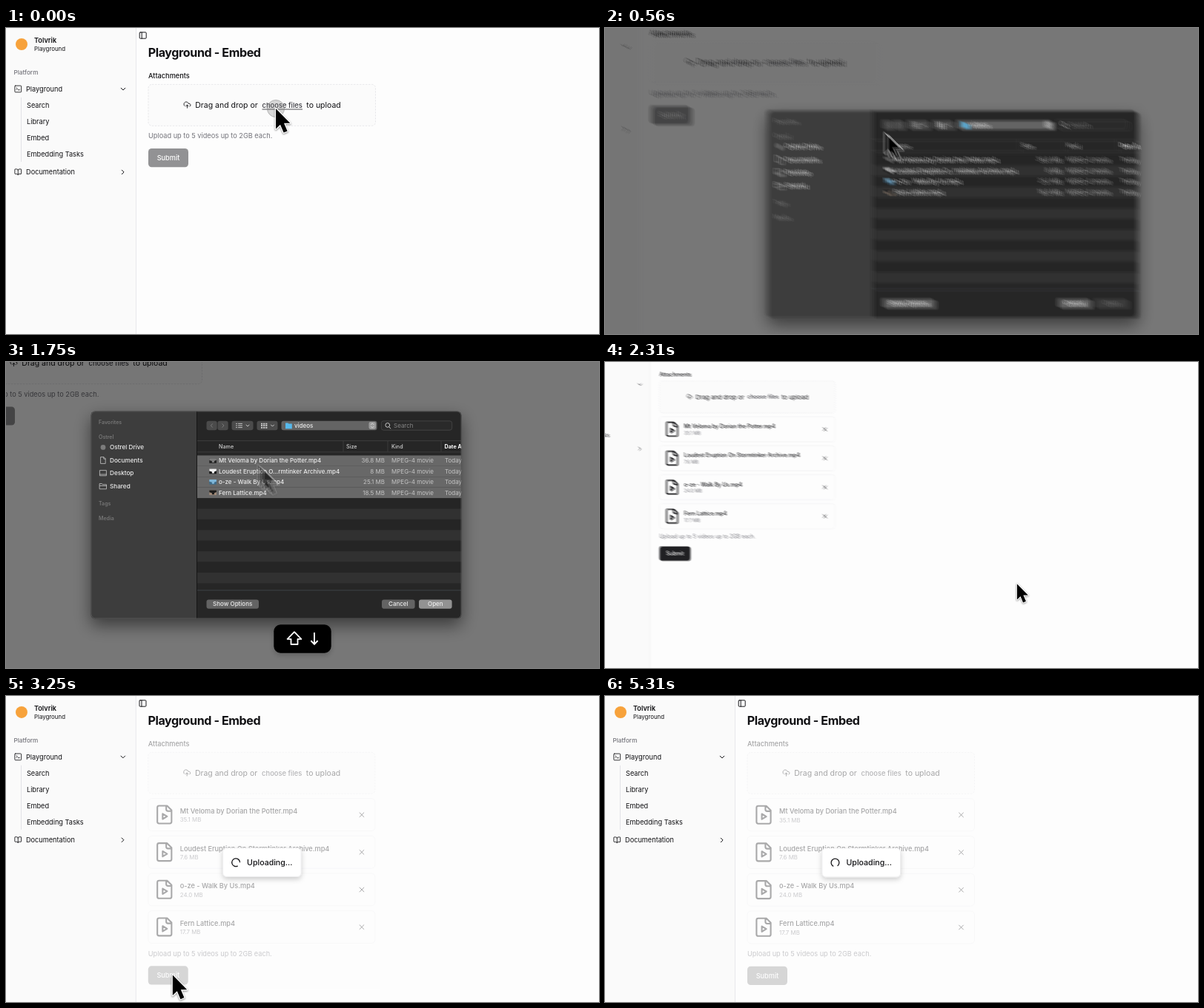
Recreate the animation shown at these times as an HTML page. Size 800 px wide and 414 px high, loop 5.37 s.

```html
<!DOCTYPE html>
<html lang="en">
<head>
<meta charset="utf-8">
<title>Upload demo</title>
<style>
  html, body { margin: 0; width: 100%; height: 100%; overflow: hidden; background: #fdfdfd; }
  svg { display: block; width: 100vw; height: 100vh; }
  text { font: 400 9.2px Inter, "Open Sans", sans-serif; fill: #111114; white-space: pre; }
  .b { font-weight: 600; }
  .m { font-weight: 500; }
  .xs { font-size: 7.9px; }
  .lg { font-size: 10.5px; }
  .mute { fill: #74747b; }
  .icon { fill: none; stroke: #18181b; stroke-width: 2; stroke-linecap: round; stroke-linejoin: round; }
  #dialog text { font-size: 8px; font-weight: 500; fill: #ececec; }
  #dialog .head { font-size: 7px; font-weight: 600; fill: #767676; }
  #dialog .side { font-size: 8.2px; }
  #dialog .col { font-size: 7.2px; fill: #d0d0d0; }
  #dialog .soft { font-weight: 400; fill: #c4c4c4; }
  #dialog .mid { text-anchor: middle; }
  .thin { fill: none; stroke: #c8c8c8; stroke-width: .8; stroke-linecap: round; stroke-linejoin: round; }
</style>
</head>
<body>
<svg viewBox="0 0 800 414" preserveAspectRatio="none">
  <defs>
    <filter id="pageBlur" filterUnits="userSpaceOnUse" x="-40" y="-40" width="1280" height="700" color-interpolation-filters="sRGB"></filter>
    <filter id="cursorBlur" filterUnits="userSpaceOnUse" x="-60" y="-60" width="150" height="160" color-interpolation-filters="sRGB"></filter>
    <filter id="deepShadow" x="-20%" y="-20%" width="140%" height="150%">
      <feDropShadow dx="0" dy="9" stdDeviation="11" flood-opacity=".5"/>
    </filter>
    <filter id="softShadow" x="-20%" y="-30%" width="140%" height="180%">
      <feDropShadow dx="0" dy="3" stdDeviation="3.5" flood-opacity=".2"/>
    </filter>
    <clipPath id="frame"><rect width="500" height="281" rx="6"/></clipPath>
  </defs>

  <g id="page">
    <rect width="1200" height="621" fill="#fdfdfd"/>
    <rect width="175.5" height="621" fill="#fafafa"/>
    <path d="M175.5 0V621" stroke="#e8e8eb"/>

    <circle cx="21" cy="22" r="8" fill="#f7a23b"/>
    <text x="38" y="19.8" class="b">Tolvrik</text>
    <text x="38" y="30.8" class="xs">Playground</text>
    <text x="10.5" y="63" class="m mute" style="font-size:8.2px">Platform</text>
    <g class="icon" transform="translate(11 77.2) scale(.4375)">
      <rect x="2" y="2" width="20" height="20" rx="2"/><path d="M7 8l3 3-3 3M12 15h5"/>
    </g>
    <text x="27" y="86">Playground</text>
    <path class="icon" style="stroke-width:1" d="M155.2 81.2l2.8 2.8 2.8-2.8"/>
    <path d="M20.5 94V181" stroke="#e2e2e6"/>
    <text x="28" y="107.8">Search</text>
    <text x="28" y="129.8">Library</text>
    <text x="28" y="152.2">Embed</text>
    <text x="28" y="174.2">Embedding Tasks</text>
    <path class="icon" transform="translate(11 189.6) scale(.4375)" d="M12 7v14M3 18a1 1 0 0 1-1-1V4a1 1 0 0 1 1-1h5a4 4 0 0 1 4 4 4 4 0 0 1 4-4h5a1 1 0 0 1 1 1v13a1 1 0 0 1-1 1h-6a3 3 0 0 0-3 3 3 3 0 0 0-3-3z"/>
    <text x="27" y="198.3">Documentation</text>
    <path class="icon" style="stroke-width:1" d="M156.3 192.2l2.8 2.8-2.8 2.8"/>
    <g class="icon" style="stroke-width:1">
      <rect x="180.2" y="5.8" width="9" height="8.4" rx="1"/><path d="M183.2 5.8v8.4"/>
    </g>

    <text x="191.7" y="38.8" style="font-size:16.1px;font-weight:700;letter-spacing:-.4px">Playground - Embed</text>
    <text x="192" y="68.4" class="m">Attachments</text>
    <rect x="192" y="76.3" width="306.5" height="56" rx="5" fill="#fbfbfb" stroke="#e8e8eb" stroke-dasharray="2.5 1.5"/>
    <path class="icon" transform="translate(239 98.6) scale(.455)" d="M4 14.9A7 7 0 1 1 15.7 8h1.8a4.5 4.5 0 0 1 2.5 8.2M12 12v9M8 16l4-4 4 4"/>
    <text x="255.3" y="107.9" class="lg">Drag and drop or</text>
    <text x="345.5" y="107.7" class="m" style="font-size:9.4px;fill:#3a3a40">choose files</text>
    <path id="underline" d="M345.5 110H400" stroke="#3a3a40" stroke-width=".9"/>
    <text x="405.3" y="107.9" class="lg">to upload</text>

    <g id="files"></g>
    <g id="footer">
      <text x="192" y="149.2" class="mute">Upload up to 5 videos up to 2GB each.</text>
      <g id="submit">
        <rect x="192" y="163" width="54" height="25.2" rx="4.5" fill="#202023"/>
        <text x="219" y="179" class="m" text-anchor="middle" style="fill:#fff">Submit</text>
      </g>
    </g>

    <g id="upload">
      <rect x="186" y="56" width="319" height="341" fill="#fdfdfd" opacity=".63"/>
      <rect x="293" y="206" width="105.5" height="38.8" rx="5" fill="#fff" stroke="#e8e8ea" stroke-width=".6" filter="url(#softShadow)"/>
      <path id="spinner" class="icon" style="stroke-width:1.3" d="M5.4 0A5.4 5.4 0 1 1 1.67 -5.14"/>
      <text x="325.5" y="229.2" class="m" style="font-size:10.6px">Uploading...</text>
    </g>

    <rect id="dim" width="1200" height="621"/>

    <g id="dialog" transform="translate(348.5 169)">
      <rect width="500" height="281" rx="6" fill="#262626" filter="url(#deepShadow)"/>
      <g clip-path="url(#frame)">
        <rect width="143" height="281" fill="#3d3d3d"/>
        <path d="M143 0V281" stroke="#171717"/>
        <text x="10.5" y="17.6" class="head">Favorites</text>
        <text x="10.5" y="37.6" class="head">Ostrel</text>
        <text x="25.5" y="52" class="side">Ostrel Drive</text>
        <text x="25.5" y="69.5" class="side">Documents</text>
        <text x="25.5" y="87" class="side">Desktop</text>
        <text x="25.5" y="104.5" class="side">Shared</text>
        <text x="10.5" y="127.8" class="head">Tags</text>
        <text x="10.5" y="147.8" class="head">Media</text>
        <circle cx="16.5" cy="49" r="3.4" fill="#7c7c7c"/>
        <path class="thin" d="M13.5 62.2h4l2.2 2.2v6.6h-6.2zM17.3 62.4v2.3h2.2M12.3 80.2h8.6v7.2h-8.6zM12.3 85.6h8.6M12 98.2h3l1 1.2h5v6h-9zM12 101h9"/>

        <g fill="#4b4b4b">
          <rect x="156" y="13.4" width="14.2" height="12.4" rx="3"/>
          <rect x="171" y="13.4" width="14.2" height="12.4" rx="3"/>
          <rect x="190" y="13.4" width="29" height="12.4" rx="3"/>
          <rect x="224" y="13.4" width="28" height="12.4" rx="3"/>
          <rect x="257" y="13.4" width="129" height="12.4" rx="3" fill="#646464"/>
          <rect x="375" y="14.6" width="9.6" height="10" rx="2.4" fill="#9a9a9a"/>
        </g>
        <path class="thin" d="M164 17.3l-2.2 2.3 2.2 2.3M177.3 17.3l2.2 2.3-2.2 2.3" style="stroke:#858585"/>
        <path class="thin" style="stroke:#e4e4e4" d="M196 17h1M199 17h5M196 19.6h1M199 19.6h5M196 22.2h1M199 22.2h5M209.5 18.7l2 2 2-2M243 18.7l2 2 2-2M378 18.4l1.8-2 1.8 2M378 20.8l1.8 2 1.8-2"/>
        <path d="M229.5 17.2h8.4M229.5 19.8h8.4M229.5 22.4h8.4" stroke="#cfcfcf" stroke-width="1.8" stroke-dasharray="2.2 .9"/>
        <path d="M262.5 16h3.4l1 1.2h4.4v6.6h-8.8z" fill="#56b9ec"/>
        <text x="274.5" y="22.5">videos</text>
        <rect x="391.8" y="13.4" width="95.4" height="12.4" rx="3" fill="#2a2a2a" stroke="#4a4a4a" stroke-width=".8"/>
        <path class="thin" style="stroke-width:1" d="M402.4 21.6l2 2M403.2 19a2.9 2.9 0 1 1-5.8 0a2.9 2.9 0 1 1 5.8 0"/>
        <text x="408.5" y="22.5" style="fill:#858585;font-weight:400">Search</text>

        <path d="M143.5 40.2H500M143.5 55.5H500M340.5 40.5V55M400.5 40.5V55M472.5 40.5V55" stroke="#434343" stroke-width=".8"/>
        <text x="172.5" y="50.5" class="col">Name</text>
        <text x="344.5" y="50.5" class="col">Size</text>
        <text x="405.5" y="50.5" class="col">Kind</text>
        <text x="477" y="50.5" class="col" style="fill:#fff;font-weight:700">Date Added</text>
        <g id="rows"></g>
        <path d="M143.5 242.5H500" stroke="#454a50" stroke-width=".8"/>

        <rect x="156" y="255" width="70.5" height="12.4" rx="3" fill="#636363"/>
        <text x="191.2" y="264.1" class="mid">Show Options</text>
        <rect x="392.5" y="255" width="44.6" height="12.4" rx="3" fill="#636363"/>
        <text x="414.8" y="264.1" class="mid">Cancel</text>
        <rect id="openBox" x="442.5" y="255" width="44.6" height="12.4" rx="3"/>
        <text id="openText" x="464.8" y="264.1" class="mid">Open</text>
      </g>
      <rect x=".4" y=".4" width="499.2" height="280.2" rx="6" fill="none" stroke="#636363" stroke-width=".8"/>
    </g>
  </g>

  <g id="pointer">
    <circle id="press" r="11.6" fill="#777" fill-opacity=".28" stroke="#8a8a8a" stroke-opacity=".55"/>
    <path d="M0 0V27.5L6 21.8L10.6 32.6L15.6 30.4L11 19.8H19.4Z" fill="#000" stroke="#fff" stroke-width="2.6" stroke-linejoin="round" paint-order="stroke" style="filter:drop-shadow(0 1px 1.2px rgba(0,0,0,.45))"/>
  </g>

  <g id="keys">
    <rect x="361.3" y="355.3" width="77.4" height="38.4" rx="9" fill="#000" filter="url(#softShadow)"/>
    <path d="M389 365.2l9.4 9.6h-4.9v7.2h-9v-7.2h-4.9z" fill="none" stroke="#fff" stroke-width="1.8" stroke-linejoin="round"/>
    <path d="M416 366v15.6M411.4 377l4.6 4.8 4.6-4.8" fill="none" stroke="#fff" stroke-width="1.9"/>
  </g>
</svg>

<script>
const LOOP = 5370, SHUTTER = 15;
const $ = id => document.getElementById(id);
const show = (id, alpha) => {
  $(id).style.opacity = alpha;
  $(id).style.display = alpha > 0 ? '' : 'none';
};

const videos = [
  { name: 'Mt Veloma by Dorian the Potter.mp4', disk: '36.8 MB', size: '35.1 MB', tone: '#7d7d7d', base: '#222' },
  { name: 'Loudest Eruption On Stormtinker Archive.mp4', short: 'Loudest Eruption O...rmtinker Archive.mp4', disk: '8 MB', size: '7.6 MB', tone: '#f0f0f0', base: '#111' },
  { name: 'o-ze - Walk By Us.mp4', disk: '25.1 MB', size: '24.0 MB', tone: '#7fb6d8', base: '#3d6a88' },
  { name: 'Fern Lattice.mp4', disk: '18.5 MB', size: '17.7 MB', tone: '#1c1c1c', base: '#a08a78' }
];
const ROW = 14.42, CARD = 50.7;

$('files').innerHTML = videos.map((v, i) => `
  <g transform="translate(0 ${i * CARD})">
    <rect x="192" y="138.8" width="306.5" height="44" rx="5" fill="#fdfdfd" stroke="#eeeef0" stroke-width=".9"/>
    <path class="icon" style="stroke-width:1.75" transform="translate(199.6 146.3) scale(1.2)"
      d="M15 2H6a2 2 0 0 0-2 2v16a2 2 0 0 0 2 2h12a2 2 0 0 0 2-2V7zM14 2v4a2 2 0 0 0 2 2h4M10 11l5 3-5 3z"/>
    <text x="235" y="159.1" class="m">${v.name}</text>
    <text x="235" y="170.6" class="xs mute">${v.size}</text>
    <path class="icon" style="stroke-width:1" d="M477.6 158l5.8 5.8m0-5.8l-5.8 5.8"/>
  </g>`).join('');

const stripes = Array.from({ length: 12 }, (_, i) =>
  `<rect x="143.5" y="${60 + i * ROW}" width="357" height="${ROW}" fill="${i % 2 ? '#313131' : '#252525'}"/>`);
const entries = videos.map((v, i) => `
  <g transform="translate(0 ${60 + i * ROW})">
    <rect id="pick${i}" x="143.5" width="357" height="${ROW}" fill="#686868"/>
    <rect x="159.8" y="3.8" width="9.6" height="6.6" fill="${v.base}"/>
    <path d="M159.8 3.8h9.6v2.6l-3 1.2v2h-3v-2l-3.6-1z" fill="${v.tone}"/>
    <text x="172.5" y="10">${v.short || v.name}</text>
    <text x="396.5" y="10" class="soft" text-anchor="end">${v.disk}</text>
    <text x="405.5" y="10" class="soft">MPEG-4 movie</text>
    <text x="477.5" y="10" class="soft">Today at 14:05</text>
  </g>`);
$('rows').innerHTML = stripes.concat(entries).join('');

// Each halving step averages the image with a shifted copy: eight samples along one line.
const HALVES = [1 / 2, 1 / 4, 1 / 8];
for (const id of ['pageBlur', 'cursorBlur']) {
  $(id).innerHTML = '<feOffset in="SourceGraphic" result="r0"/>' + HALVES.map((_, i) => `
    <feOffset in="r${i}" result="o${i}"/>
    <feComposite in="r${i}" in2="o${i}" operator="arithmetic" k2=".5" k3=".5" result="r${i + 1}"/>`).join('');
}

const ramp = (t, a, b) => Math.min(1, Math.max(0, (t - a) / (b - a)));
const fade = (t, a, b, c, d) => ramp(t, a, b) * (1 - ramp(t, c, d));

// Critically damped spring from 0 to 1.
const spring = (t, start, rate) => {
  const x = Math.max(0, t - start) * rate;
  return 1 - (1 + x) * Math.exp(-x);
};

function camera(t) {
  const leave = spring(t, 2107, .0115);
  const hold = spring(t, 400, .0115) * (1 - leave);
  return { x: -234 * hold, y: -102.6 * hold, s: 1 - (leave - spring(t, 2570, .0115)) / 3 };
}

const stops = [[364, 109], [570, 239], [816, 431], [225, 378]];
const departs = [397, 1732, 2500];

function cursor(t) {
  return [0, 1].map(axis => departs.reduce((sum, start, i) =>
    sum + (stops[i + 1][axis] - stops[i][axis]) * spring(t, start, .015), stops[0][axis]));
}

function project(t, [x, y]) {
  const c = camera(t);
  return [c.x + x * c.s, c.y + y * c.s];
}

// Blurs along the way a point travels while the shutter is open.
function smear(target, filter, t, point) {
  const a = point(t - SHUTTER / 2), b = point(t + SHUTTER / 2);
  const d = a.map((v, i) => b[i] - v);
  const moving = Math.hypot(...d) > .5;
  target.setAttribute('filter', moving ? `url(#${filter})` : 'none');
  if (!moving) return;
  const shifts = [-7 / 16, ...HALVES];
  $(filter).querySelectorAll('feOffset').forEach((el, i) => {
    el.setAttribute('dx', d[0] * shifts[i]);
    el.setAttribute('dy', d[1] * shifts[i]);
  });
}

const clicks = [0, 2080, 3010];
const picks = [1000, 1290, 1440, 1590];

function draw(t) {
  const c = camera(t);
  $('page').setAttribute('transform', `translate(${c.x} ${c.y}) scale(${c.s})`);
  smear($('page'), 'pageBlur', t, time => project(time, [270, 150]));

  const [x, y] = project(t, cursor(t));
  $('pointer').setAttribute('transform', `translate(${x} ${y}) scale(${c.s})`);
  smear($('pointer'), 'cursorBlur', t, cursor);
  const visible = t < 1400 ? 1 - ramp(t, 900, 1080) : fade(t, 1690, 1790, 4050, 4350);
  show('pointer', visible);
  show('press', Math.max(...clicks.map(k => t < k ? 0 : 1 - ramp(t, k + 80, k + 200))));

  const open = fade(t, 170, 290, 2100, 2210);
  show('dim', open * .53);
  show('dialog', open);
  picks.forEach((at, i) => show('pick' + i, t >= at ? 1 : 0));
  const ready = t >= picks[0];
  $('openBox').setAttribute('fill', ready ? '#929292' : '#3b3b3b');
  $('openText').style.fill = ready ? '#eee' : '#707070';
  show('keys', fade(t, 1230, 1310, 1900, 2030));

  const added = t >= 2170;
  show('underline', t < 450 ? 1 : 0);
  show('files', added ? 1 : 0);
  $('footer').setAttribute('transform', `translate(0 ${added ? 4 * CARD : 0})`);
  show('submit', added && t < 3060 ? 1 : .48);
  show('upload', ramp(t, 3060, 3150));
  $('spinner').setAttribute('transform', `translate(310.5 225.5) rotate(${66 + (t - 3250) * .376})`);
}

const begin = performance.now();
function tick() {
  draw((performance.now() - begin) % LOOP);
  requestAnimationFrame(tick);
}
tick();
</script>
</body>
</html>
```
